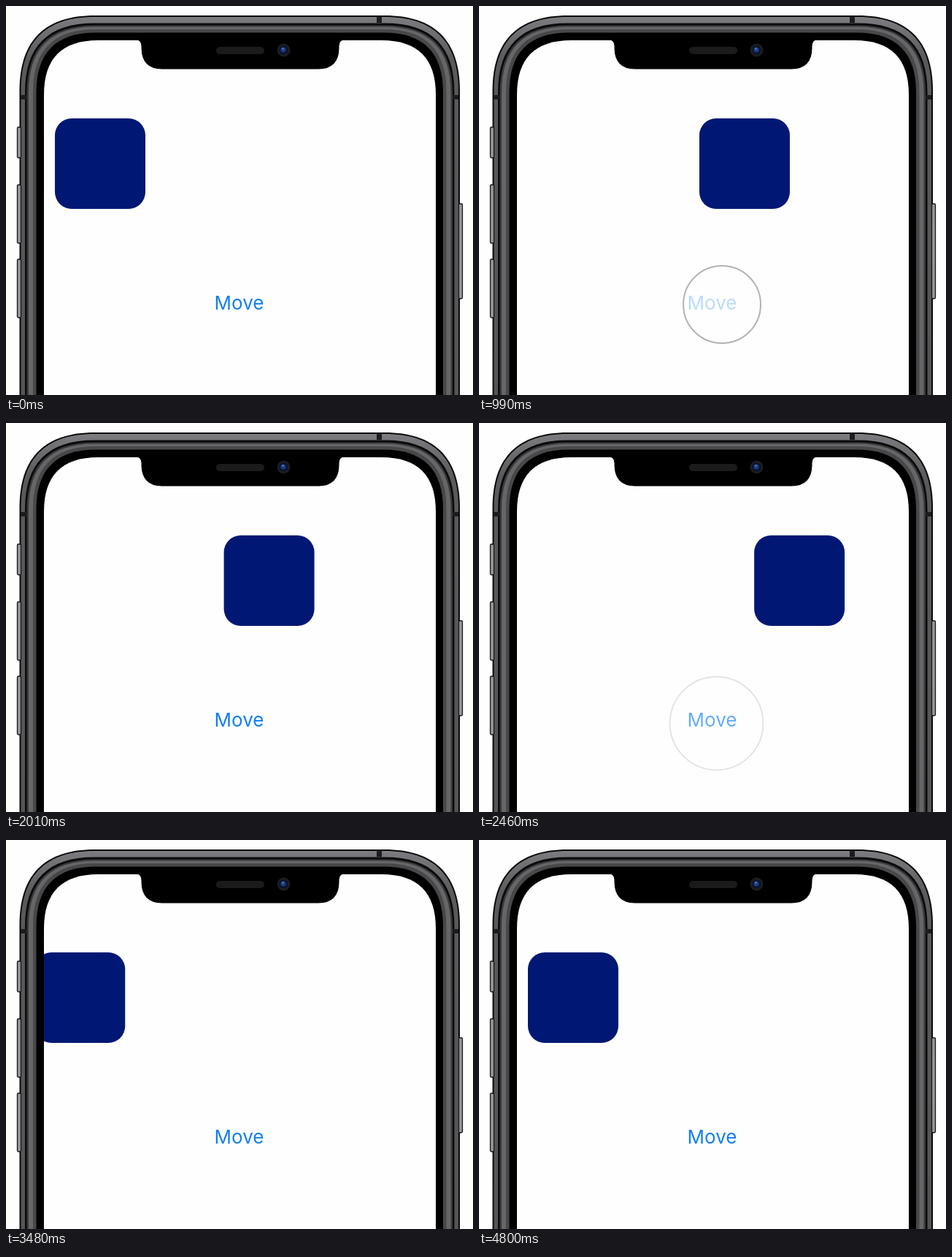
These frames come from a looping animation (640x533 px, 4980 ms). An HTML page:

```html
<!DOCTYPE html>
<html lang="en">
<head>
<meta charset="utf-8">
<title>Move</title>
<style>
  html, body { margin: 0; width: 100%; height: 100%; overflow: hidden; background: #fefefe; }
  svg { display: block; width: 100vw; height: 100vh; }
  .button { fill: #98989b; stroke: #161616; stroke-width: 1.3; }
  .seam { fill: #1c1c1e; }
  #label { font: 26px Inter, "Liberation Sans", sans-serif; fill: #127ff0; text-anchor: middle; }
  #touch { fill: none; stroke: #b3b3b7; stroke-width: 2; }
</style>
</head>
<body>
<svg viewBox="0 0 640 533">
  <defs>
    <linearGradient id="metal" x2="0" y2="1">
      <stop offset="0" stop-color="#7c7c80"/>
      <stop offset=".1" stop-color="#5a5a5d"/>
      <stop offset="1" stop-color="#545456"/>
    </linearGradient>
    <clipPath id="screen"><path id="glass"/></clipPath>
  </defs>

  <g id="body"></g>

  <g class="button">
    <rect x="15.5" y="166" width="5" height="42" rx="1.500"/>
    <rect x="15.5" y="245" width="5" height="80" rx="1.500"/>
    <rect x="15.5" y="347" width="5" height="80" rx="1.500"/>
    <rect x="620.5" y="271" width="5" height="130" rx="1.500"/>
  </g>

  <g class="seam">
    <rect x="508" y="15" width="7" height="8"/>
    <rect x="20" y="122" width="8" height="6"/>
    <rect x="612" y="122" width="8" height="6"/>
  </g>

  <g clip-path="url(#screen)">
    <rect width="640" height="533" fill="#fefefe"/>
    <rect id="box" y="154" width="124" height="124" rx="23" fill="#001873"/>
    <text id="label" x="319.5" y="416">Move</text>
    <circle id="touch"/>
  </g>

  <path d="M178 46 Q185.500 47 185.500 55 V58 Q186 86.500 214 86.500 H428 Q456 86.500 456.500 58 V55 Q456.500 47 464 46 Z"/>
  <rect x="288" y="56" width="66" height="10" rx="5" fill="#1b1b1b"/>
  <circle cx="380.500" cy="60.500" r="9" fill="#1b1d20"/>
  <circle cx="380.500" cy="60.500" r="6" fill="#0b142c"/>
  <circle cx="380" cy="60" r="3.600" fill="#1d3b84"/>
  <circle cx="379.500" cy="58.500" r="1.200" fill="#5f80c8"/>
</svg>
<script>
const LOOP = 4980, STEP = 30;
const PRESS = 100, FADE = 300;

// Turning points of the interrupted spring: [time, left edge]
const turns = [
  [630, 67], [1210, 410], [1680, 79], [2265, 445], [2810, 206],
  [2880, 207.5], [3060, 260], [3515, 36], [4400, 67]
];

// Finger taps: [down, up, x, y]
const taps = [
  [540, 680, 338, 402], [880, 1110, 333, 409], [1545, 1640, 342, 401],
  [2190, 2310, 325.5, 411.5], [2490, 2590, 333, 407], [2890, 2970, 336, 402]
];

// Nested shells of the case: [left, top, corner, fill]
const shells = [
  [18.5, 13, 86, '#080808'], [20.5, 15, 84, 'url(#metal)'], [26, 23.5, 79, '#0a0a0a'],
  [28.5, 26.5, 77, '#3a3a3c'], [31, 28.5, 75, '#666668'], [37, 32, 71, '#48484a'],
  [41.5, 36.5, 68, '#000']
];

const $ = id => document.getElementById(id);
const set = (el, attrs) => {
  for (const k in attrs) el.setAttribute(k, attrs[k]);
};

// Tall outline with smooth continuous corners
function outline(left, right, top, r) {
  const c = r * 0.4, e = r * 1.2;
  return `M${left} 600V${top + e}C${left} ${top + c} ${left + c} ${top} ${left + e} ${top}` +
    `H${right - e}C${right - c} ${top} ${right} ${top + c} ${right} ${top + e}V600Z`;
}

for (const [x, y, r, fill] of shells) {
  const shell = document.createElementNS('http://www.w3.org/2000/svg', 'path');
  set(shell, { d: outline(x, 640.5 - x, y, r), fill });
  $('body').append(shell);
}
set($('glass'), { d: outline(52, 589, 47, 62) });

function boxAt(t) {
  const i = turns.findIndex(p => p[0] > t);
  if (i <= 0) return 67;
  const [t0, a] = turns[i - 1], [t1, b] = turns[i];
  return a + (b - a) * (1 - Math.cos(Math.PI * (t - t0) / (t1 - t0))) / 2;
}

// How firmly a tap shows, from 0 to 1
function pressure(t, down, up) {
  return Math.max(0, Math.min(1, (t - down) / PRESS, 1 - (t - up) / FADE));
}

function draw(now) {
  const t = Math.floor(now % LOOP / STEP) * STEP;
  set($('box'), { x: boxAt(t) });

  const [down, up, cx, cy] = taps.filter(tap => tap[0] <= t).pop() || taps[0];
  const p = pressure(t, down, up);
  set($('touch'), { cx, cy, r: 67.5 - 14.5 * p * p, opacity: p ** 1.5 });
  set($('label'), { opacity: 1 - 0.72 * p });
}

const start = performance.now();
function tick() {
  draw(performance.now() - start);
  requestAnimationFrame(tick);
}
tick();
</script>
</body>
</html>
```
